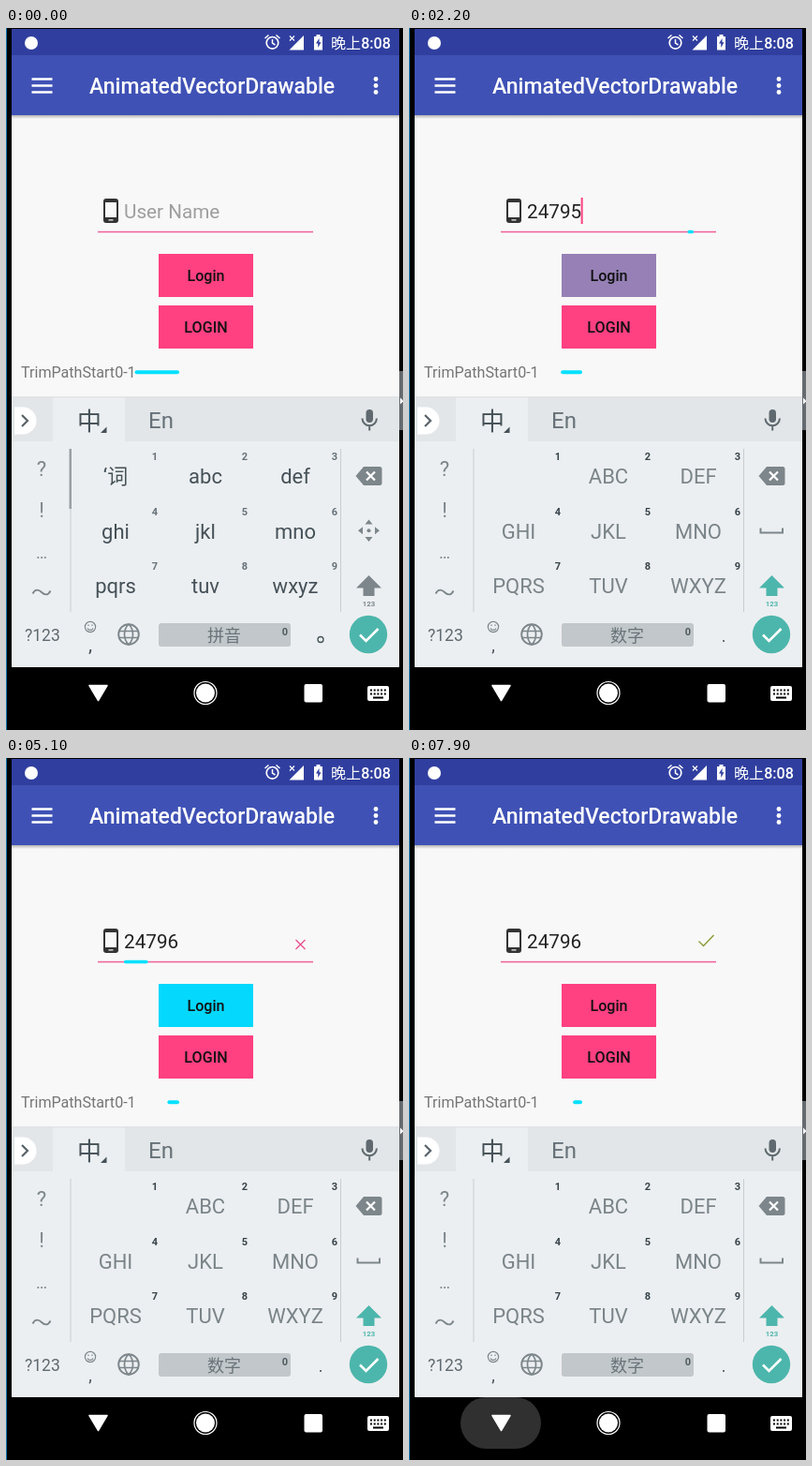
Recreate the animation shown at these times as an HTML page. Size 424 px wide and 749 px high, loop 8000 ms.

```html
<!DOCTYPE html>
<html lang="zh">
<head>
<meta charset="utf-8">
<style>
html, body { margin: 0; width: 100%; height: 100%; overflow: hidden; background: #000; }
svg { display: block; width: 100vw; height: 100vh; }
text { font-family: Roboto, "Noto Sans CJK SC", "Noto Sans CJK", sans-serif; }
.m { font-weight: 500; }
</style>
</head>
<body>
<svg id="stage" viewBox="0 0 424 749"></svg>
<script>
const LOOP = 8000;
const PINK = [255, 64, 129], CYAN = [0, 219, 255];
const TEAL = '#4db6ac', KEY = '#7c868b', DARK = '#455158';

const rect = (x, y, w, h, fill, more = '') =>
  `<rect x="${x}" y="${y}" width="${w}" height="${h}" fill="${fill}" ${more}/>`;
const circle = (x, y, r, fill, more = '') =>
  `<circle cx="${x}" cy="${y}" r="${r}" fill="${fill}" ${more}/>`;
const shape = (d, fill, more = '') => `<path d="${d}" fill="${fill}" ${more}/>`;
const stroke = (d, color, width, more = '') =>
  `<path d="${d}" fill="none" stroke="${color}" stroke-width="${width}" ${more}/>`;
const text = (x, y, size, fill, str, more = '') =>
  `<text x="${x}" y="${y}" font-size="${size}" fill="${fill}" ${more}>${str}</text>`;
const mid = 'text-anchor="middle"';
const midBold = mid + ' font-weight="700"';
const medium = 'class="m"';

const statusBar = () =>
  rect(6, 1, 414, 28, '#303f9f') +
  circle(27, 16, 7, '#fff') +
  circle(284.5, 15.8, 6.3, 'none', 'stroke="#fff" stroke-width="1.7"') +
  stroke('M284.5 12v4.2l3 1.8M276.5 11l4-3.5M292.5 11l-4-3.5', '#fff', 1.5) +
  shape('M318 8v15.500h-15.500z', '#fff') +
  stroke('M303 8.500l5 5m0-5l-5 5', '#fff', 1.2) +
  shape('M329 9h2.500v-2h4v2h2.500v14.500h-9z', '#fff') +
  shape('M334.500 11l-3.500 5.500h2.200v4.500l3.300-5.800h-2z', '#303f9f') +
  text(347, 21.5, 16.1, '#fff', '晚上8:08', medium);

const toolbar = () =>
  rect(6, 29, 414, 64, '#3f51b5') +
  rect(6, 93, 414, 4, 'url(#shade)') +
  stroke('M27.500 54.500h22m-22 7h22m-22 7h22', '#fff', 2.3) +
  text(89, 70, 23, '#fff', 'AnimatedVectorDrawable', medium) +
  [54.5, 61.5, 68.5].map(y => circle(395, y, 2.4, '#fff')).join('');

const form = () =>
  rect(104, 182, 16, 26, '#333', 'rx="3"') +
  rect(106, 186, 12, 16, '#f8f8f8') +
  rect(109.5, 204.3, 5, 1.2, '#f8f8f8') +
  text(126, 203, 20.7, '#222', '', 'id="entry"') +
  rect(98, 216.8, 230, 1.5, '#f0609a') +
  stroke('', '#00e0ff', 3.4, 'id="sweep" stroke-linecap="round"') +
  rect(0, 181, 2, 28, '#ff4081', 'id="caret"') +
  stroke('M309.500 194l10 10M319.500 194l-10 10', '#ec4f8d', 1.3, 'id="cross" pathLength="2"') +
  stroke('M309.500 195.500l5 5L325.500 189', '#8a9a35', 1.4, 'id="tick" pathLength="1"') +
  rect(163, 241, 101, 46, '#ff4081', 'id="login"') +
  text(213.5, 270, 16.1, '#111', 'Login', medium + mid) +
  rect(163, 296, 101, 46, '#ff4081') +
  text(213.5, 325, 16.1, '#111', 'LOGIN', medium + ' ' + mid) +
  text(16, 373, 16.1, '#757575', 'TrimPathStart0-1') +
  stroke('', '#00e0ff', 4, 'id="bar" stroke-linecap="round"');

const keyCenter = i => [117 + (i % 3) * 96, 486 + Math.floor(i / 3) * 58.5];

function letterKeys(labels, color, numberColor) {
  return labels.map((label, i) => {
    const [x, y] = keyCenter(i);
    return text(x, y, 22, color, label, mid) +
      text(x + 42, y - 25, 11, numberColor, i + 1, midBold);
  }).join('');
}

const shiftKey = color =>
  shape('M387.500 584l13.500 13.500h-7.500v8.500h-12v-8.500h-7.500z', color) +
  text(387.5, 617, 7.8, color, '123', midBold);

const layout = (id, labels, color, numberColor, more) =>
  `<g id="${id}">${letterKeys(labels, color, numberColor)}${more}</g>`;

const LETTERS = ['‘词', 'abc', 'def', 'ghi', 'jkl', 'mno', 'pqrs', 'tuv', 'wxyz'];
const CAPS = LETTERS.map((s, i) => i ? s.toUpperCase() : '');

const keyboard = () =>
  rect(6, 394, 414, 288, '#eceff1') +
  rect(6, 394, 414, 47, '#e2e6e8') +
  rect(50, 394, 77, 47, '#eceff1') +
  rect(6, 393, 414, 1.5, '#e2e4e5') +
  shape('M9 404.500h9a14.500 14.500 0 0 1 0 29h-9z', '#fff') +
  stroke('M17 413l6 6-6 6', '#59636a', 2.2) +
  text(89, 429, 26, DARK, '中', mid) +
  shape('M107.500 425.500v6.500h-6.500z', DARK) +
  text(152, 427, 24, '#667178', 'En') +
  rect(384.5, 407, 7.5, 14, '#5f696f', 'rx="3.7"') +
  stroke('M380.500 416.500a7.700 7.700 0 0 0 15.400 0M388.200 424.500v5', '#5f696f', 2) +
  rect(0, 0, 0, 0, '#d3d8db', 'id="press"') +
  rect(68.5, 449, 1, 174, '#c8cdd0') +
  rect(357, 449, 1, 174, '#c8cdd0') +
  rect(67.5, 449, 2.5, 64, '#98a1a6', 'id="thumb"') +
  text(38, 478, 22, KEY, '?', mid) + text(38, 522, 22, KEY, '!', mid) +
  text(38, 566, 18, KEY, '…', mid) +
  stroke('M28.500 603.500c3-6 7-4 9.500-1.500s6.500 4.500 9.500-1.500', KEY, 1.8) +
  shape('M382 468h17a2.500 2.500 0 0 1 2.500 2.500v15a2.500 2.500 0 0 1-2.500 2.500h-17l-8.500-10z', KEY) +
  stroke('M385 473.500l9 9m0-9l-9 9', '#fff', 2.2) +
  text(20, 654, 17.5, '#5f6a70', '?123') +
  circle(90, 639, 5.6, 'none', `stroke="${KEY}" stroke-width="1.2"`) +
  stroke('M87 640.500a3.300 3.300 0 0 0 6 0M88 636.500v1.500M92 636.500v1.500', KEY, 1.2) +
  circle(131, 647, 10.8, 'none', `stroke="${KEY}" stroke-width="1.9"`) +
  stroke('M131 636c-6 6-6 16 0 22c6-6 6-16 0-22M121 643.500h20M121 650.500h20', KEY, 1.7) +
  rect(163, 635, 141, 25, '#c1c7ca', 'rx="3" id="space"') +
  text(298, 648, 11, '#4f5a60', '0', midBold) +
  circle(387, 647, 20.2, TEAL) +
  stroke('M378 647.500l6.500 6.500L397.500 641', '#fff', 2.6) +
  layout('pinyin', LETTERS, '#455158', '#66727a',
    shiftKey(KEY) + text(233, 654.5, 18, '#69747a', '拼音', mid) +
    shape('M387.500 524.500l4 5h-8zM387.500 548l4-5h-8zM376 536.200l5-4v8zM399 536.200l-5-4v8z', KEY) +
    circle(387.5, 536.2, 2, KEY) +
    circle(336, 652.5, 3, 'none', `stroke="${DARK}" stroke-width="1.3"`) +
    text(90, 665, 21, DARK, ',', mid)) +
  layout('numeric', CAPS, '#7a8489', '#37434a',
    shiftKey(TEAL) + text(233, 654.5, 18, '#69747a', '数字', mid) +
    stroke('M375.500 533.500v5h23.500v-5', KEY, 2) +
    text(336, 655, 18, DARK, '.', mid) +
    text(90, 665, 18, DARK, ',', mid));

const navBar = () =>
  rect(6, 682, 414, 67, '#000') +
  rect(55, 682, 86, 55, '#303030', 'rx="27.5" id="ripple"') +
  shape('M89 701.500h19l-9.500 16z', '#fff', 'stroke="#fff" stroke-width="1.500" stroke-linejoin="round"') +
  circle(213, 709.5, 10, '#fff') +
  circle(213, 709.5, 12, 'none', 'stroke="#fff" stroke-width="1.2"') +
  rect(318.5, 700, 19.5, 19.5, '#fff', 'rx="2"') +
  rect(386, 702, 23, 16, '#fff', 'rx="2"') +
  stroke('M389 706.500h17M389 710.500h17', '#000', 2, 'stroke-dasharray="2 1.700"') +
  rect(392, 713.5, 11, 2, '#000');

const stage = document.getElementById('stage');
stage.innerHTML =
  `<defs><linearGradient id="shade" x2="0" y2="1"><stop stop-color="#000" stop-opacity=".28"/>
   <stop offset="1" stop-color="#000" stop-opacity="0"/></linearGradient></defs>` +
  rect(0, 0, 424, 749, '#000') + rect(0, 0, 1, 749, '#1173a8') +
  rect(6, 93, 414, 301, '#f8f8f8') +
  statusBar() + toolbar() + form() + keyboard() + navBar() +
  rect(420, 366, 4, 63, '#666b70') + shape('M421 394.500l3.500 3.500-3.500 3.500z', '#fff');

const el = {};
stage.querySelectorAll('[id]').forEach(node => el[node.id] = node);

const clamp = v => Math.max(0, Math.min(1, v));
const ease = v => (1 - Math.cos(Math.PI * clamp(v))) / 2;
const show = (node, on) => node.setAttribute('visibility', on ? 'visible' : 'hidden');
const set = (node, attrs) => {
  for (const name in attrs) node.setAttribute(name, attrs[name]);
};

// Each entry: time the text changes, new text, key box pressed just before.
const cell = (col, row) => [70 + 96 * col, 449 + 58.5 * row, 95, 57];
const ZERO = [163, 635, 141, 25];
const EDITS = [
  [200, '', [359, 566, 59, 57]],
  [500, '2', cell(0, 0)],
  [750, '24', ZERO],
  [1000, '247', ZERO],
  [1100, '2479', cell(1, 2)],
  [1200, '24795', cell(1, 1)],
  [4200, '2479', [359, 449, 59, 57]],
  [4500, '24796', cell(2, 1)]
];
const NUMERIC_AT = 200, PRESS = 100, BLINK = 458;
const CLICKS = [1543, 5001], SWEEP = 870, FADE = 1180, DRAW = 540;

function drawEntry(t) {
  const last = EDITS.filter(e => e[0] <= t).pop();
  const value = last ? last[1] : '';
  el.entry.textContent = value || 'User Name';
  el.entry.setAttribute('fill', value ? '#222' : '#9e9e9e');
  const caretOn = last && Math.floor((t - last[0]) / BLINK) % 2 === 0;
  show(el.caret, caretOn);
  el.caret.setAttribute('x', 125.5 + value.length * 11.63);

  const pressed = EDITS.find(e => t >= e[0] - PRESS && t < e[0]);
  const zero = pressed && pressed[2] === ZERO;
  show(el.press, pressed && !zero);
  el.space.setAttribute('fill', zero ? '#aab2b6' : '#c1c7ca');
  if (pressed) {
    const [x, y, width, height] = pressed[2];
    set(el.press, { x, y, width, height });
  }
}

function drawLogin(t) {
  const start = CLICKS.filter(c => c <= t).pop() ?? -LOOP;
  const age = t - start;
  const p = ease(age / SWEEP);
  const at = v => 98 + 230 * (v + (1 - v) * p);
  show(el.sweep, age < SWEEP);
  el.sweep.setAttribute('d', `M${at(.1)} 217.500H${at(.2)}`);

  const back = ease(age / FADE);
  const mix = CYAN.map((c, i) => Math.round(c + (PINK[i] - c) * back));
  el.login.setAttribute('fill', `rgb(${mix})`);
}

function drawMark(node, t, from, until, length) {
  show(node, t > from && t < until);
  const drawn = length * ease((t - from) / DRAW);
  node.setAttribute('stroke-dasharray', `${drawn} ${length * 2}`);
}

function drawBar(t) {
  const cycle = t < 1700 ? .07 + t / 881 : (t - 1700) / 917;
  el.bar.setAttribute('d', `M${139 + 44 * ease(cycle % 1)} 367.300H183`);
}

function render(t) {
  show(el.pinyin, t < NUMERIC_AT);
  show(el.numeric, t >= NUMERIC_AT);
  el.thumb.setAttribute('opacity', 1 - clamp((t - 850) / 250));
  drawEntry(t);
  drawLogin(t);
  const [first, second] = CLICKS.map(c => c + SWEEP);
  drawMark(el.cross, t, first, second, 2);
  drawMark(el.tick, t, second, LOOP, 1);
  drawBar(t);
  const ripple = clamp((t - 7650) / 200);
  const width = 86 * (.4 + .6 * ripple);
  set(el.ripple, { opacity: ripple, x: 98 - width / 2, width });
}

const origin = performance.now();
function tick() {
  render((performance.now() - origin) % LOOP);
  requestAnimationFrame(tick);
}
render(0);
requestAnimationFrame(tick);
</script>
</body>
</html>
```
